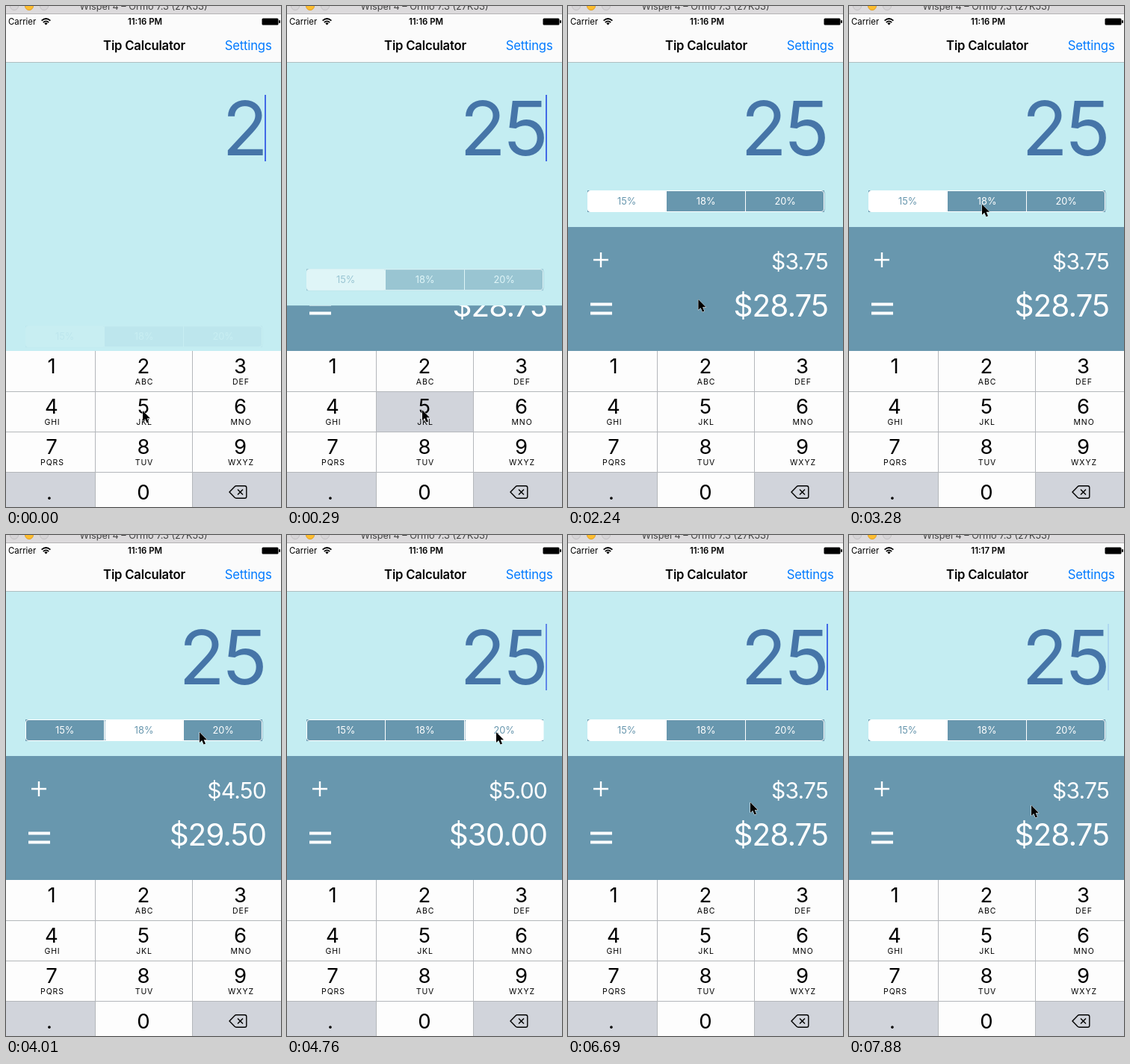
These frames come from a looping animation (368 by 671 pixels, 8 s). An HTML page:

```html
<!DOCTYPE html>
<html lang="en">
<head>
<meta charset="utf-8">
<title>Tip Calculator</title>
<style>
  html, body { margin: 0; height: 100%; overflow: hidden; }
  svg { display: block; width: 100vw; height: 100vh; font-family: Inter, Roboto, sans-serif; }
  .mid { text-anchor: middle; }
  .end { text-anchor: end; }
  .nav { font-size: 16.7px; letter-spacing: -.2px; }
  .bill { font-size: 101px; fill: #4675a8; text-anchor: middle; }
  .money { fill: #fff; text-anchor: end; letter-spacing: -.025em; }
  .digit { font-size: 27.5px; }
  .letters { font-size: 10.5px; letter-spacing: .9px; }
  .segment { font-size: 12.8px; }
</style>
</head>
<body>
<svg viewBox="0 0 368 671">
  <rect width="368" height="671" fill="#c4edf2"/>

  <!-- result panel, uncovered as the bill area shrinks -->
  <rect y="296" width="368" height="170" fill="#6897ae"/>
  <path d="M34 340H54M44 330V350" stroke="#fff" stroke-width="2.4"/>
  <path d="M30 399.5H59M30 411.5H59" stroke="#fff" stroke-width="4"/>
  <text id="tip" class="money" x="348" y="353" font-size="30"></text>
  <text id="total" class="money" x="348" y="415.5" font-size="40.5"></text>

  <rect id="billArea" y="76" width="368" fill="#c4edf2"/>
  <g id="bill"></g>
  <rect id="caret" x="346" y="119" width="2" height="89" fill="#4169e6"/>
  <g id="segments"></g>

  <!-- window, status and navigation bars -->
  <rect width="368" height="75" fill="#fbfbfb"/>
  <rect y="75" width="368" height="1" fill="#aebfc2"/>
  <rect width="368" height="10" fill="#dcdadc"/>
  <rect y="10" width="368" height="1" fill="#b4b2b4"/>
  <g fill="#d6d4d6" stroke="#c2c0c2">
    <circle cx="11" cy="0" r="5.5"/>
    <circle cx="31" cy="0" r="5.5" fill="#fdbd2e" stroke="#e0a028"/>
    <circle cx="51" cy="0" r="5.5"/>
  </g>
  <text class="mid" x="184" y="5" font-size="12.7" fill="#444">Wispel 4 – Ormo 7.3 (27K53)</text>
  <text x="3" y="25" font-size="11.4">Carrier</text>
  <g fill="none" stroke="#000" stroke-width="1.7">
    <path d="M47.6 19.6Q53.5 14.4 59.4 19.6M49.8 22Q53.5 18.8 57.2 22"/>
    <path d="M51.3 23.2Q53.5 21.4 55.7 23.2L53.5 25.6Z" fill="#000" stroke="none"/>
  </g>
  <text id="clock" class="mid" x="186" y="25" font-size="11.4" font-weight="600"></text>
  <rect x="342.5" y="16.5" width="22" height="9" rx="1.5"/>
  <rect x="365" y="19" width="2" height="4" rx="1"/>
  <text class="nav mid" x="185" y="59" font-weight="600">Tip Calculator</text>
  <text class="nav end" x="355.5" y="59" fill="#007aff">Settings</text>

  <g id="keys"></g>
  <g transform="translate(311 651)" fill="none" stroke="#000" stroke-width="1.4">
    <path d="M-12 0L-5 -7.3Q-4 -8.2 -3 -8.2H8.5Q10.8 -8.2 10.8 -6V6Q10.8 8.2 8.5 8.2H-3Q-4 8.2 -5 7.3Z"/>
    <path d="M-1 -3.6L6 3.6M6 -3.6L-1 3.6"/>
  </g>
  <path id="pointer" d="M0 0V14L3.2 11.1L5.6 16.6L8 15.5L5.7 10.2H10Z" stroke="#fff" stroke-width="1" paint-order="stroke"/>
</svg>

<script>
const $ = id => document.getElementById(id);
const SLATE = '#6897ae', GREY = '#d1d4db', RULE = '#b4b7bb';
const LOOP = 8000, TICK = 148.6;
const rates = [15, 18, 20];
const smooth = u => u * u * (3 - 2 * u);
const clamp = u => Math.max(0, Math.min(1, u));

function buildKeys() {
  const lefts = [0, 120, 250, 368], centres = [61, 184, 313.5];
  const tops = [462, 517, 571, 625, 671];
  const labels = ['1', '2ABC', '3DEF', '4GHI', '5JKL', '6MNO', '7PQRS', '8TUV', '9WXYZ', '.', '0', ''];
  let out = `<rect y="462" width="368" height="209" fill="${RULE}"/>`;
  labels.forEach((label, i) => {
    const col = i % 3, row = Math.floor(i / 3), x = lefts[col], y = tops[row];
    const width = lefts[col + 1] - x - (col < 2), height = tops[row + 1] - y - (row < 3);
    const fill = row === 3 && col !== 1 ? GREY : '#fdfdfd';
    const baseline = row === 3 ? 661 : 492 + 54 * row;
    const middle = label === '.' ? 58 : centres[col];
    out += `<rect id="key${i + 1}" x="${x}" y="${y}" width="${width}" height="${height}" fill="${fill}"/>
      <text class="digit mid" x="${middle}" y="${baseline}">${label.slice(0, 1)}</text>
      <text class="letters mid" x="${middle + 1}" y="${baseline + 15.3}">${label.slice(1)}</text>`;
  });
  $('keys').innerHTML = out;
}

function drawSegments(selected, pressed) {
  let out = `<rect x="26" y="247" width="317" height="29" fill="${SLATE}"/>`;
  rates.forEach((rate, i) => {
    const x = 26 + 106 * i;
    const fill = i === selected ? '#fff' : i === pressed ? '#80a6b8' : SLATE;
    out += `<rect x="${x + .5}" y="247.5" width="105" height="28" rx="3" fill="${fill}"/>
      <text class="segment mid" x="${x + 52.7}" y="266" fill="${i === selected ? SLATE : '#fff'}">${rate}%</text>`;
  });
  out += `<path d="M131.5 248V275M237.5 248V275" stroke="#fff"/>
    <rect x="26.5" y="247.5" width="316" height="28" rx="3.5" fill="none" stroke="#fff"/>`;
  $('segments').innerHTML = out;
}

// time, x, y
const pointerPath = [
  [0, 183, 542], [290, 181, 541], [740, 67, 609], [1040, 80, 641], [1500, 86, 652],
  [2080, 100, 648], [2230, 175, 391], [2840, 178, 268], [3600, 178, 264], [4010, 259, 264],
  [4300, 280, 264], [5300, 280, 264], [5750, 106, 262], [6000, 106, 262],
  [6390, 244, 358], [7600, 244, 358], [7730, 244, 362]
];

function pointerAt(t) {
  const next = pointerPath.findIndex(p => p[0] > t);
  if (next < 0) return pointerPath.at(-1).slice(1);
  const [t0, x0, y0] = pointerPath[next - 1], [t1, x1, y1] = pointerPath[next];
  const u = smooth((t - t0) / (t1 - t0));
  return [x0 + (x1 - x0) * u, y0 + (y1 - y0) * u];
}

function caretOpacity(t) {
  if (t < 800) return 1;
  const phase = (t + 100) % 1000;
  return phase < 800 ? clamp((phase - 390) / 150) : (1000 - phase) / 200;
}

function render(now) {
  const step = Math.floor((now % LOOP + 12) / TICK);
  const t = Math.max(0, step * TICK - 7);

  const reveal = smooth(clamp((t + 144) / 920));
  const drop = 194 * (1 - reveal);
  $('billArea').setAttribute('height', 220 + drop);
  $('segments').setAttribute('transform', `translate(0 ${drop})`);
  $('segments').setAttribute('opacity', reveal);

  const selected = step < 24 || step >= 40 ? 0 : step < 31 ? 1 : 2;
  const pressed = { 23: 1, 30: 2, 39: 0 }[step];
  drawSegments(selected, pressed);

  const digits = step < 1 ? '2' : '25';
  $('bill').innerHTML = [...digits].map((digit, i) =>
    `<text class="bill" x="${320 - 58 * (digits.length - 1 - i)}" y="199.5">${digit}</text>`).join('');
  const tip = digits * rates[selected] / 100;
  $('tip').textContent = '$' + tip.toFixed(2);
  $('total').textContent = '$' + (+digits + tip).toFixed(2);

  $('key5').setAttribute('fill', step === 1 || step === 2 ? GREY : '#fdfdfd');
  $('caret').setAttribute('opacity', caretOpacity(t));
  $('clock').textContent = step < 52 ? '11:16 PM' : '11:17 PM';
  $('pointer').setAttribute('transform', `translate(${pointerAt(t)})`);
}

buildKeys();
const start = performance.now();
function frame() {
  render(performance.now() - start);
  requestAnimationFrame(frame);
}
frame();
</script>
</body>
</html>
```
